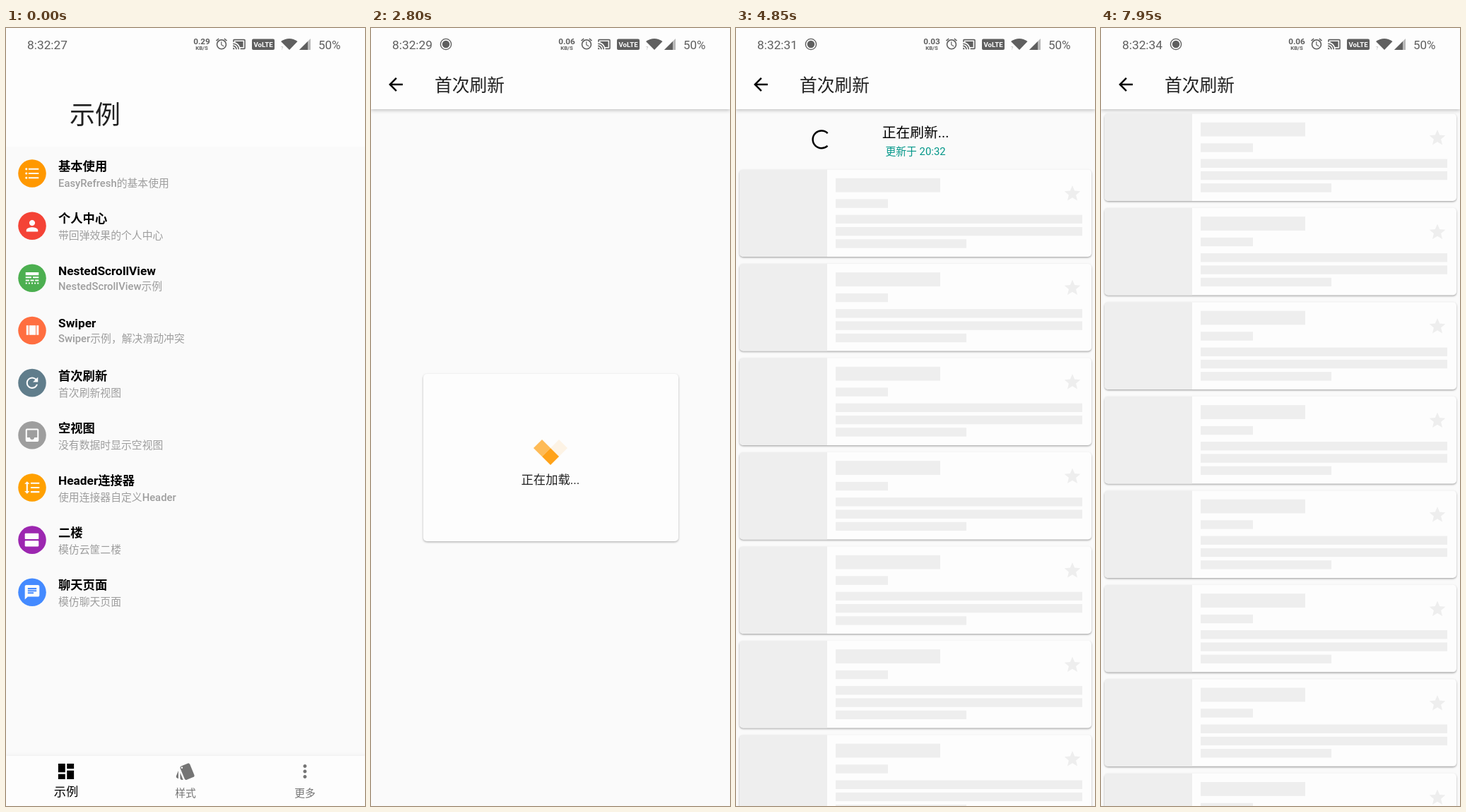
Animation, 508 px wide and 1102 px high, one loop 8 s. Source, as an HTML page with a canvas:

```html
<!DOCTYPE html>
<html lang="zh-CN">
<head>
<meta charset="utf-8">
<style>
html, body { margin: 0; width: 100%; height: 100%; overflow: hidden; background: #fafafa; }
canvas { display: block; }
</style>
</head>
<body>
<canvas id="stage" width="508" height="1102"></canvas>
<script>
const W = 508, H = 1102, DP = 508 / 411, LOOP = 8000;
const BG = '#fafafa', WHITE = '#fdfdfd', BONE = '#eeeeee', GREY = '#5f5f5f', INK = '#212121';
const FONT = 'Roboto, "Noto Sans CJK SC", "Noto Sans CJK", sans-serif';
const REST = 120.2, BAR = 115, HEADER = 60 * DP;
// Moments of the story, in ms
const PRESS = 800, OPEN = 965, LOAD = 1240, LOADED = 3240;
const DRAG = 4050, RELEASE = 4405, DONE = 6480, BACK = 7430;

const screen = document.getElementById('stage').getContext('2d');
const layer = Object.assign(document.createElement('canvas'), { width: W, height: H }).getContext('2d');
let c = screen;

const icons = {
  dashboard: 'M3 13h8V3H3v10zm0 8h8v-6H3v6zm10 0h8V11h-8v10zm0-18v6h8V3h-8z',
  style: 'M2.53 19.65l1.34.56v-9.03l-2.43 5.86c-.41 1.02.08 2.19 1.09 2.61zm19.5-3.7L17.07 3.98c-.31-.75-1.04-1.21-1.81-1.23-.26 0-.53.04-.79.15L7.1 5.95c-.75.31-1.21 1.03-1.23 1.8-.01.27.04.54.15.8l4.96 11.97c.31.76 1.05 1.22 1.83 1.23.26 0 .52-.05.77-.15l7.36-3.05c1.02-.42 1.51-1.59 1.09-2.6zM7.88 8.75c-.55 0-1-.45-1-1s.45-1 1-1 1 .45 1 1-.45 1-1 1zm-2 11c0 1.1.9 2 2 2h1.45l-3.45-8.34v6.34z',
  more: 'M12 8c1.1 0 2-.9 2-2s-.9-2-2-2-2 .9-2 2 .9 2 2 2zm0 2c-1.1 0-2 .9-2 2s.9 2 2 2 2-.9 2-2-.9-2-2-2zm0 6c-1.1 0-2 .9-2 2s.9 2 2 2 2-.9 2-2-.9-2-2-2z',
  list: 'M4 10.5c-.83 0-1.5.67-1.5 1.5s.67 1.5 1.5 1.5 1.5-.67 1.5-1.5-.67-1.5-1.5-1.5zm0-6c-.83 0-1.5.67-1.5 1.5S3.17 7.5 4 7.5 5.5 6.83 5.5 6 4.83 4.5 4 4.5zm0 12c-.83 0-1.5.68-1.5 1.5s.68 1.5 1.5 1.5 1.5-.68 1.5-1.5-.67-1.5-1.5-1.5zM7 19h14v-2H7v2zm0-6h14v-2H7v2zm0-8v2h14V5H7z',
  person: 'M12 12c2.21 0 4-1.79 4-4s-1.79-4-4-4-4 1.79-4 4 1.79 4 4 4zm0 2c-2.67 0-8 1.34-8 4v2h16v-2c0-2.66-5.33-4-8-4z',
  lines: 'M3 16h5v-2H3v2zm6.5 0h5v-2h-5v2zm6.5 0h5v-2h-5v2zM3 20h2v-2H3v2zm4 0h2v-2H7v2zm4 0h2v-2h-2v2zm4 0h2v-2h-2v2zm4 0h2v-2h-2v2zM3 12h8v-2H3v2zm10 0h8v-2h-8v2zM3 4v4h18V4H3z',
  array: 'M4 18h3V5H4v13zM18 5v13h3V5h-3zM8 18h9V5H8v13z',
  refresh: 'M17.65 6.35C16.2 4.9 14.21 4 12 4c-4.42 0-7.99 3.58-7.99 8s3.57 8 7.99 8c3.73 0 6.84-2.55 7.73-6h-2.08c-.82 2.33-3.04 4-5.65 4-3.31 0-6-2.69-6-6s2.69-6 6-6c1.66 0 3.14.69 4.22 1.78L13 11h7V4l-2.35 2.35z',
  inbox: 'M19 3H4.99c-1.11 0-1.98.89-1.98 2L3 19c0 1.1.88 2 1.99 2H19c1.1 0 2-.9 2-2V5c0-1.11-.9-2-2-2zm0 12h-4c0 1.66-1.35 3-3 3s-3-1.34-3-3H4.99V5H19v10z',
  spacing: 'M6 7h2.5L5 3.5 1.5 7H4v10H1.5L5 20.5 8.5 17H6V7zm4-2v2h12V5H10zm0 14h12v-2H10v2zm0-6h12v-2H10v2z',
  agenda: 'M20 13H3c-.55 0-1 .45-1 1v6c0 .55.45 1 1 1h17c.55 0 1-.45 1-1v-6c0-.55-.45-1-1-1zm0-10H3c-.55 0-1 .45-1 1v6c0 .55.45 1 1 1h17c.55 0 1-.45 1-1V4c0-.55-.45-1-1-1z',
  chat: 'M20 2H4c-1.1 0-1.99.9-1.99 2L2 22l4-4h14c1.1 0 2-.9 2-2V4c0-1.1-.9-2-2-2zM6 9h12v2H6V9zm8 5H6v-2h8v2zm4-6H6V6h12v2z',
  back: 'M20 11H7.83l5.59-5.59L12 4l-8 8 8 8 1.41-1.41L7.83 13H20v-2z',
  down: 'M20 12l-1.41-1.41L13 16.17V4h-2v12.17l-5.58-5.59L4 12l8 8 8-8z',
  up: 'M4 12l1.41 1.41L11 7.83V20h2V7.83l5.58 5.59L20 12l-8-8-8 8z',
  done: 'M9 16.2L4.8 12l-1.4 1.4L9 19 21 7l-1.4-1.4L9 16.2z',
  star: 'M12 17.27L18.18 21l-1.64-7.03L22 9.24l-7.19-.61L12 2 9.19 8.63 2 9.24l5.46 4.73L5.82 21z',
  alarm: 'M22 5.72l-4.6-3.86-1.29 1.53 4.6 3.86L22 5.72zM7.88 3.39L6.6 1.86 2 5.71l1.29 1.53 4.59-3.85zM12.5 8H11v6l4.75 2.85.75-1.23-4-2.37V8zM12 4c-4.97 0-9 4.03-9 9s4.02 9 9 9c4.97 0 9-4.03 9-9s-4.03-9-9-9zm0 16c-3.87 0-7-3.13-7-7s3.13-7 7-7 7 3.13 7 7-3.13 7-7 7z',
  cast: 'M21 3H3c-1.1 0-2 .9-2 2v3h2V5h18v14h-7v2h7c1.1 0 2-.9 2-2V5c0-1.1-.9-2-2-2zM1 18v3h3c0-1.66-1.34-3-3-3zm0-4v2c2.76 0 5 2.24 5 5h2c0-3.87-3.13-7-7-7zm0-4v2c4.97 0 9 4.03 9 9h2c0-6.08-4.93-11-11-11zM19 7H5v1.63c3.96 1.28 7.09 4.41 8.37 8.37H19V7z'
};
for (const k in icons) icons[k] = new Path2D(icons[k]);

const rows = [
  ['list', '#ff9800', '基本使用', 'EasyRefresh的基本使用'],
  ['person', '#f44336', '个人中心', '带回弹效果的个人中心'],
  ['lines', '#4caf50', 'NestedScrollView', 'NestedScrollView示例'],
  ['array', '#ff6e40', 'Swiper', 'Swiper示例，解决滑动冲突'],
  ['refresh', '#607d8b', '首次刷新', '首次刷新视图'],
  ['inbox', '#9e9e9e', '空视图', '没有数据时显示空视图'],
  ['spacing', '#ffa000', 'Header连接器', '使用连接器自定义Header'],
  ['agenda', '#9c27b0', '二楼', '模仿云筐二楼'],
  ['chat', '#448aff', '聊天页面', '模仿聊天页面']
];

const clamp = x => Math.min(1, Math.max(0, x));

function bezier(x1, y1, x2, y2) {
  const at = (a, b, s) => 3 * (1 - s) * (1 - s) * s * a + 3 * (1 - s) * s * s * b + s * s * s;
  return x => {
    let lo = 0, hi = 1;
    for (let i = 0; i < 20; i++) {
      const mid = (lo + hi) / 2;
      if (at(x1, x2, mid) < x) lo = mid; else hi = mid;
    }
    return at(y1, y2, lo);
  };
}
const swift = bezier(.4, 0, .2, 1), easeIn = bezier(.42, 0, 1, 1);

// Overdamped scroll spring: share of the distance left after s seconds
const spring = s => (22 * Math.exp(-9.07 * s) - 9.07 * Math.exp(-22 * s)) / 12.93;

function rect(x, y, w, h, fill) {
  c.fillStyle = fill;
  c.fillRect(x, y, w, h);
}

function disc(x, y, r, fill) {
  c.fillStyle = fill;
  c.beginPath();
  c.arc(x, y, r, 0, 7);
  c.fill();
}

function poly(points, fill) {
  c.fillStyle = fill;
  c.beginPath();
  points.forEach(p => c.lineTo(...p));
  c.fill();
}

function text(s, x, y, size, fill = INK, weight = 400, align = 'left') {
  c.font = `${weight} ${size}px ${FONT}`;
  c.textAlign = align;
  c.fillStyle = fill;
  c.fillText(s, x, y);
}

function icon(name, x, y, scale, fill) {
  c.save();
  c.translate(x - 12 * scale, y - 12 * scale);
  c.scale(scale, scale);
  c.fillStyle = fill;
  c.fill(icons[name]);
  c.restore();
}

function raised(x, y, w, h, r, blur, dy, alpha) {
  c.save();
  c.shadowColor = `rgba(0,0,0,${alpha})`;
  c.shadowBlur = blur;
  c.shadowOffsetY = dy;
  c.fillStyle = WHITE;
  c.beginPath();
  c.roundRect(x, y, w, h, r);
  c.fill();
  c.restore();
}

function ripple(t) {
  const p = (t - PRESS) / 450;
  if (p <= 0 || p >= 1) return;
  c.save();
  c.beginPath();
  c.rect(0, 466, W, 74);
  c.clip();
  const shade = `rgba(0,0,0,${.05 * Math.min(1, p * 4, (1 - p) * 2)})`;
  rect(0, 466, W, 74, shade);
  disc(200, 503, 20 + 160 * p, shade);
  c.restore();
}

function home(t) {
  rect(0, 0, W, H, BG);
  rect(0, 0, W, 168, WHITE);
  text('示例', 90, 136, 36);
  ripple(t);
  rows.forEach(([name, color, title, note], i) => {
    const y = 206 + i * 60 * DP, latin = /^\w+$/.test(title);
    disc(37, y, 16 * DP, color);
    icon(name, 37, y, 20 * DP / 24, WHITE);
    text(title, 74, y - (latin ? 4.6 : 3.8), 14 * DP, '#000', 700);
    text(note, 74, y + (latin ? 16.5 : 19), 12 * DP, '#9e9e9e', 500);
  });
  raised(0, 1031, W, 80, 0, 5, -1, .05);
  [['dashboard', '示例', '#000'], ['style', '样式', '#757575'], ['more', '更多', '#757575']].forEach(([name, label, color], i) => {
    const x = 85 + i * 169;
    icon(name, x, 1053, DP, color);
    text(label, x, i ? 1088.5 : 1087.5, (i ? 12 : 14) * DP, color, 400, 'center');
  });
}

function loading(t) {
  raised(74, 490, 361, 237, 5, 3, 1.2, .3);
  const turn = (t - LOAD) / 2400, side = 17;
  c.save();
  c.translate(254, 595);
  c.rotate(-Math.PI / 4);
  for (let i = 0; i < 4; i++) {
    c.globalAlpha = (Math.sin((turn - .3 * i) * 2 * Math.PI) + 1) / 2;
    rect(0, 0, side, side, '#ff9800');
    c.rotate(Math.PI / 2);
  }
  c.restore();
  text('正在加载...', 254, 645.5, 14 * DP, INK, 400, 'center');
}

function pulled(t) {
  const top = 277;
  if (t < DRAG) return 0;
  if (t < RELEASE) return top * (1 - (1 - (t - DRAG) / (RELEASE - DRAG)) ** 2);
  if (t < BACK) return HEADER + (top - HEADER) * spring((t - RELEASE) / 1000);
  return HEADER * spring((t - BACK) / 1000);
}

function spinner(x, y, s) {
  const p = s % 1, full = 1.5 * Math.PI;
  const head = swift(clamp(p * 2)) * full, tail = swift(clamp(p * 2 - 1)) * full;
  const start = -Math.PI / 2 + tail + p * 1.7 * Math.PI - Math.floor(s) * .8 * Math.PI;
  c.strokeStyle = '#000';
  c.lineWidth = 2 * DP;
  c.beginPath();
  c.arc(x, y, 10 * DP, start, start + Math.max(head - tail, .001));
  c.stroke();
}

function header(t, top, offset) {
  if (offset < .5) return;
  const ready = offset > 70 * DP;
  let label = ready ? '释放刷新' : '拉动刷新';
  if (t >= DONE) label = '刷新完成';
  else if (t >= RELEASE) label = '正在刷新...';
  if (t >= RELEASE && t < DONE) spinner(121, top - 42.5, (t - RELEASE) / 1000);
  else icon(t >= DONE ? 'done' : ready ? 'up' : 'down', 118, top - 43, DP, '#000');
  text(label, 254, top - 45.5, 16 * DP, '#000', 400, 'center');
  text('更新于 20:32', 254, top - 20.3, 12 * DP, '#009688', 400, 'center');
}

function skeleton(y) {
  raised(5, y, 498, 100 * DP, 5, 2.5, 1.3, .35);
  c.fillStyle = BONE;
  c.beginPath();
  c.roundRect(5, y, 124, 100 * DP, [5, 0, 0, 5]);
  c.fill();
  [[10, 148, 16], [34, 74, 10], [52, 349, 10], [66, 349, 10], [80, 185, 10]].forEach(([top, w, h]) =>
    rect(141, y + top * DP, w, h * DP, BONE));
  icon('star', 476, y + 34, 1.13, BONE);
}

function page(t) {
  rect(0, 0, W, H, BG);
  if (t >= LOADED) {
    const offset = pulled(t), top = REST + offset;
    header(t, top, offset);
    for (let y = top; y < H; y += 108 * DP) skeleton(y);
  } else if (t >= LOAD) loading(t);
  raised(0, -10, W, BAR + 10, 0, 5, 2, .22);
  icon('back', 35, 80, DP, '#000');
  text('首次刷新', 90, 89.5, 20 * DP);
}

function status(t) {
  const second = 27 + Math.max(0, Math.floor((t - 50) / 1000));
  text('8:32:' + second, 30, 29.5, 17.3, GREY);
  const dot = clamp((t - 200) / 300);
  if (dot) {
    c.globalAlpha = dot;
    disc(106, 23, 5.2 * dot, GREY);
    c.strokeStyle = GREY;
    c.lineWidth = 1.4;
    c.beginPath();
    c.arc(106, 23, 7.6 * dot, 0, 7);
    c.stroke();
    c.globalAlpha = 1;
  }
  const rate = t < 1850 ? '0.29' : t < 4850 ? '0.06' : t < 7850 ? '0.03' : '0.06';
  text(rate, 277, 22.5, 11.8, GREY, 700, 'center');
  text('KB/S', 277, 30.5, 7.8, GREY, 700, 'center');
  icon('alarm', 305, 22.5, .8, GREY);
  icon('cast', 330, 23, .8, GREY);
  c.fillStyle = GREY;
  c.beginPath();
  c.roundRect(348, 15.5, 32, 15.5, 2);
  c.fill();
  text('VoLTE', 364, 27, 9.6, WHITE, 700, 'center');
  c.fillStyle = GREY;
  c.beginPath();
  c.moveTo(401, 31);
  c.lineTo(389, 19);
  c.quadraticCurveTo(401, 11, 412.5, 19);
  c.fill();
  text('?', 389, 31, 7, '#b5b5b5');
  poly([[415, 31], [431, 15], [431, 31]], '#b8b8b8');
  poly([[415, 31], [427, 19], [427, 31]], GREY);
  text('50%', 442, 29.5, 17, GREY);
}

function draw(t) {
  const p = clamp((t - OPEN) / 300);
  if (p < 1) home(t);
  if (p > 0) {
    c = layer;
    page(t);
    c = screen;
    c.globalAlpha = easeIn(p);
    c.drawImage(layer.canvas, 0, Math.round(H / 4 * (1 - swift(p))));
    c.globalAlpha = 1;
  }
  status(t);
}

function tick() {
  draw(performance.now() % LOOP);
  requestAnimationFrame(tick);
}
tick();
</script>
</body>
</html>
```
